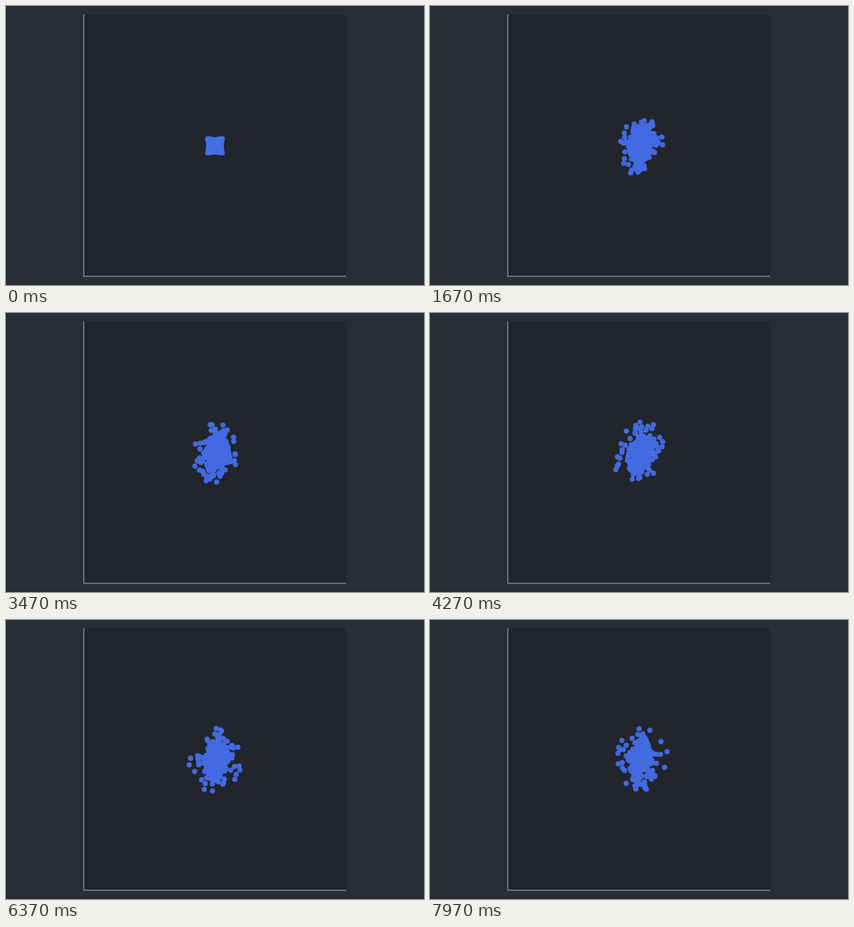
Recreate the animation shown at these times as an HTML page with a canvas. Size 600 by 400 pixels, loop 8000 ms.

```html
<!DOCTYPE html>
<html lang="en">
<head>
<meta charset="utf-8">
<title>Particle cluster</title>
<style>
  html, body { margin: 0; width: 100%; height: 100%; overflow: hidden; background: #292d35; }
  canvas { display: block; }
</style>
</head>
<body>
<canvas id="stage" width="600" height="400"></canvas>
<script>
const ctx = document.getElementById('stage').getContext('2d');
const LOOP = 8, START = 0.03, RELEASE = 0.75;
const GRID = 20, STRAY_SHARE = 0.14, TAU = Math.PI * 2;
const CENTER = { x: 300, y: 200.4 };

let seed = 7;
function random() {
  seed = (seed * 1664525 + 1013904223) % 4294967296;
  return seed / 4294967296;
}

// An elliptical orbit; strays swing wider and drift outwards with time.
function makeOrbit() {
  const stray = random() < STRAY_SHARE ? 0.1 + 0.9 * random() : 0;
  const radius = stray ? 1 : 0.1 + 0.88 * random();
  const speed = TAU / (1.2 + radius + stray) * (random() < 0.5 ? -1 : 1);
  const phase = random() * TAU, turn = random() * TAU;
  const flat = 0.25 + 0.75 * random();
  const ct = Math.cos(turn), st = Math.sin(turn);
  return t => {
    const a = radius * Math.cos(speed * t + phase);
    const b = radius * flat * Math.sin(speed * t + phase);
    const spread = stray * Math.min(1, 0.5 + 0.08 * t);
    const y = (33 + 16 * spread) * (a * st + b * ct);
    return { x: 2 + (19 + 23 * spread) * (a * ct - b * st) - 0.12 * y, y };
  };
}

// Bodies start in a square whose sides are drawn in.
const bodies = Array.from({ length: GRID * GRID }, (_, i) => {
  const u = (i % GRID) / (GRID - 1) * 2 - 1;
  const v = Math.floor(i / GRID) / (GRID - 1) * 2 - 1;
  return {
    x: 10.3 * u * (1 - 0.16 * (1 - v * v)),
    y: 10.1 * v * (1 - 0.14 * (1 - u * u)),
    orbit: makeOrbit()
  };
});

function rect(color, x, y, w, h) {
  ctx.fillStyle = color;
  ctx.fillRect(x, y, w, h);
}

function drawPanel() {
  rect('#292d35', 0, 0, 600, 400);
  rect('#252931', 0, 398, 600, 2);
  rect('#22252c', 112, 12, 376, 376);
  ctx.strokeStyle = '#85888c';
  ctx.lineWidth = 1.5;
  ctx.beginPath();
  ctx.moveTo(111.6, 12);
  ctx.lineTo(111.6, 387.6);
  ctx.lineTo(488, 387.6);
  ctx.stroke();
}

function drawBodies(t) {
  const p = Math.min(1, Math.max(0, (t - START) / RELEASE));
  const mix = p * p * (3 - 2 * p);
  ctx.fillStyle = '#4169e1';
  ctx.strokeStyle = '#4a72e3';
  ctx.lineWidth = 0.6;
  for (const body of bodies) {
    const o = body.orbit(t);
    const x = CENTER.x + body.x + (o.x - body.x) * mix;
    const y = CENTER.y + body.y + (o.y - body.y) * mix;
    ctx.beginPath();
    ctx.arc(x, y, 3.5, 0, TAU);
    ctx.fill();
    ctx.stroke();
  }
}

const begin = performance.now();
function frame() {
  drawPanel();
  drawBodies((performance.now() - begin) / 1000 % LOOP);
  requestAnimationFrame(frame);
}
frame();
</script>
</body>
</html>
```
